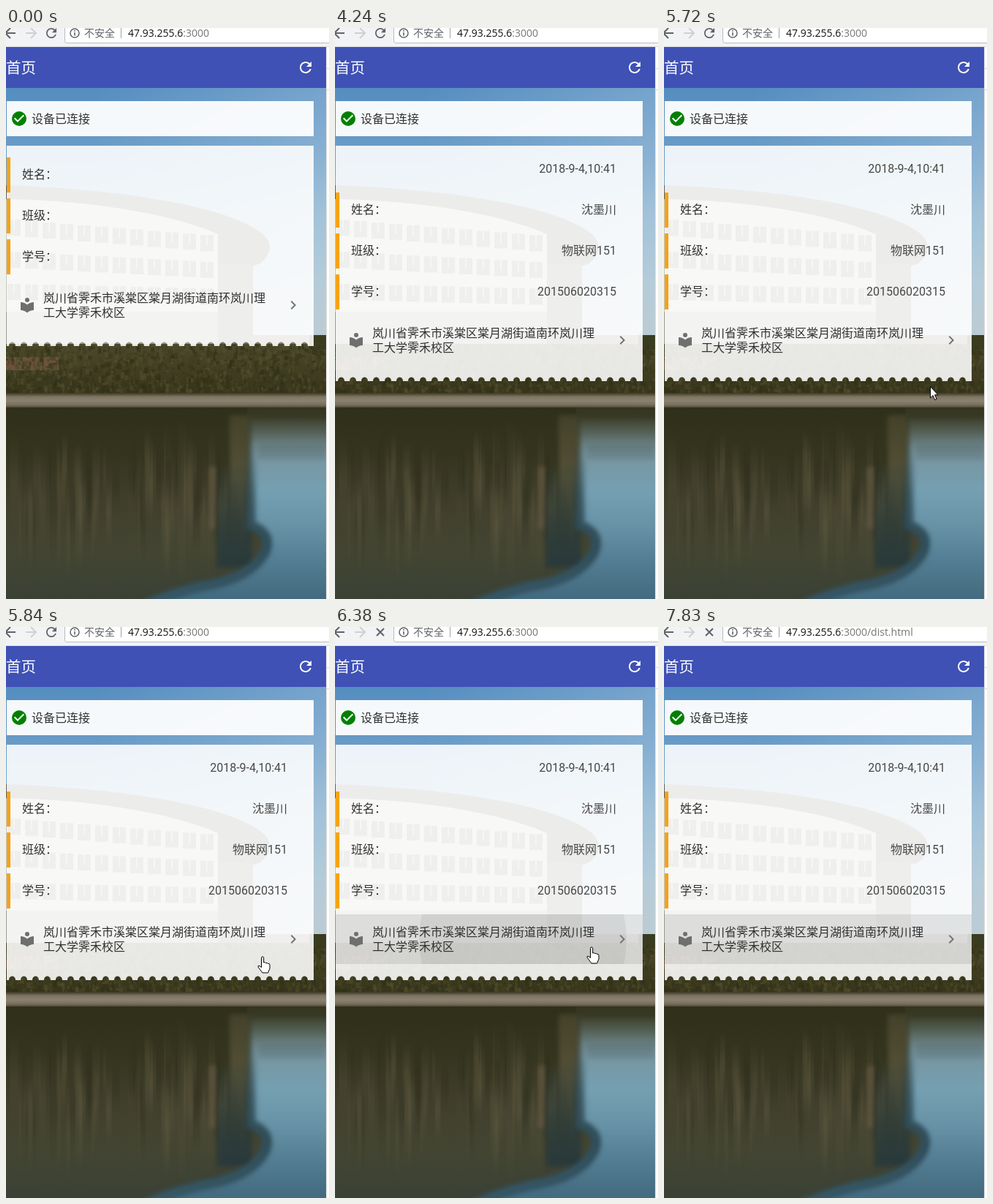
An HTML page with a canvas for the animation above (8000 ms loop, 442x781 px).

```html
<!DOCTYPE html>
<html lang="zh-CN">
<head>
<meta charset="utf-8">
<title>首页</title>
<style>
  html, body { margin: 0; width: 100%; height: 100%; overflow: hidden; background: #fff; }
  canvas, svg { position: absolute; left: 0; top: 0; }
  text { font: 16px Roboto, 'Noto Sans CJK SC', 'Noto Sans CJK', sans-serif; fill: #303030; white-space: pre; }
  .browser text { font: 14px 'Open Sans', 'Noto Sans CJK SC', 'Noto Sans CJK', sans-serif; fill: #5f6368; }
  .value { fill: #484848; text-anchor: end; }
  .line { fill: none; stroke: #5f6368; stroke-width: 2; }
  .cursor { fill: #fff; stroke: #000; stroke-linejoin: round; }
</style>
</head>
<body>
<canvas id="photo" width="442" height="781"></canvas>
<svg width="442" height="781" viewBox="0 0 442 781">
  <defs>
    <path id="refresh" d="M17.65 6.35C16.2 4.9 14.21 4 12 4c-4.42 0-7.99 3.58-7.99 8s3.57 8 7.99 8c3.73 0 6.84-2.55 7.73-6h-2.08c-.82 2.33-3.04 4-5.65 4-3.31 0-6-2.69-6-6s2.69-6 6-6c1.66 0 3.14.69 4.22 1.78L13 11h7V4z"/>
    <clipPath id="rowClip"><rect x="1" y="345" width="420" height="68"/></clipPath>
  </defs>

  <g class="browser">
    <rect width="442" height="26" fill="#f2f3f4"/>
    <rect y="25" width="442" height="1" fill="#dcdde0"/>
    <rect x="80.5" y="-10" width="400" height="30.5" rx="3" fill="#fff" stroke="#b9bbbe"/>
    <path class="line" d="M13 7H0M6 0L-1 7l7 7"/>
    <path class="line" style="stroke:#cfd0d2" d="M27 7h13M34 0l7 7-7 7"/>
    <use id="reload" href="#refresh" fill="#5f6368" transform="translate(51.5 -3.5) scale(.88)"/>
    <path id="stop" class="line" d="M57 2l10 10M67 2L57 12"/>
    <circle cx="94" cy="7" r="6" class="line" style="stroke-width:1.5"/>
    <path class="line" style="stroke-width:1.6" d="M94 6v4.5M94 3v1.8"/>
    <text x="107" y="12">不安全</text>
    <rect x="157" width="1" height="14" fill="#a0a3a7"/>
    <text x="167" y="12"><tspan fill="#111">47.93.255.6</tspan><tspan fill="#777">:3000</tspan><tspan id="path" fill="#777">/dist.html</tspan></text>
  </g>

  <rect x="438" y="26" width="4" height="755" fill="#fff"/>
  <path d="M438.5 26V781M438 55.5h4M438 84.5h4" stroke="#d8d8d8"/>

  <rect y="26" width="438" height="56" fill="#3f51b5"/>
  <text x="0" y="61.5" style="font-size:20.5px;fill:#fff">首页</text>
  <use href="#refresh" fill="#fff" transform="translate(398 42)"/>

  <rect x="1" y="100" width="420" height="48" fill="#fff" fill-opacity=".94"/>
  <circle cx="18" cy="124" r="10" fill="#008000"/>
  <path d="M11.7 123.3l4.3 4.3 8.3-8.3" fill="none" stroke="#fff" stroke-width="2"/>
  <text x="35" y="129.5">设备已连接</text>

  <path id="card" fill="#fff" fill-opacity=".88"/>
  <text id="date" class="value" x="385" y="198">2018-9-4,10:41</text>
  <g id="rows">
    <g fill="#f5a314">
      <rect x="1" y="177" width="5" height="48"/>
      <rect x="1" y="233" width="5" height="48"/>
      <rect x="1" y="289" width="5" height="48"/>
    </g>
    <text x="22" y="206">姓名：</text>
    <text x="22" y="262">班级：</text>
    <text x="22" y="318">学号：</text>
    <g id="values">
      <text id="name" class="value" x="385" y="206"></text>
      <text class="value" x="385" y="262">物联网151</text>
      <text id="number" class="value" x="385" y="318"></text>
    </g>
    <g clip-path="url(#rowClip)">
      <rect id="hover" x="1" y="345" width="420" height="68" fill-opacity=".09"/>
      <circle id="ripple" cx="257" cy="379" fill-opacity=".06"/>
    </g>
    <path fill="#6f6f6f" transform="translate(17 367)" d="M12 11.55C9.64 9.35 6.48 8 3 8v11c3.48 0 6.64 1.35 9 3.55 2.36-2.19 5.52-3.55 9-3.55V8c-3.48 0-6.64 1.35-9 3.55zM12 8a3 3 0 1 0 0-6 3 3 0 0 0 0 6z"/>
    <text x="51" y="374.5">岚川省霁禾市溪棠区棠月湖街道南环岚川理</text>
    <text x="51" y="394.5">工大学霁禾校区</text>
    <path fill="#757575" transform="translate(381 367)" d="M10 6L8.59 7.41 13.17 12l-4.58 4.59L10 18l6-6z"/>
  </g>

  <path id="arrow" class="cursor" d="M.5 .5V16l3.6-3.4 2.6 6 2.4-1-2.6-5.8H11z"/>
  <path id="hand" class="cursor" d="M5.5 13V2.5a1.6 1.6 0 0 1 3.2 0V9q1.5-1 3 .6 1.5-.7 2.7.7 2.6-.4 2.6 2V17l-2.5 6H7L1 15q-.5-2.5 2-1.5l2.5 2z"/>
</svg>

<script>
const $ = id => document.getElementById(id);
const ctx = $('photo').getContext('2d');

let seed = 7;
const random = (min, max) => {
  seed = (seed * 16807) % 2147483647;
  return min + (max - min) * seed / 2147483647;
};
const gradient = (x0, y0, x1, y1, ...colors) => {
  const g = ctx.createLinearGradient(x0, y0, x1, y1);
  colors.forEach((c, i) => g.addColorStop(i / (colors.length - 1), c));
  return g;
};
const rect = (fill, x, y, w, h) => { ctx.fillStyle = fill; ctx.fillRect(x, y, w, h); };
const shape = (fill, d) => { ctx.fillStyle = fill; ctx.fill(new Path2D(d)); };

function drawSky() {
  rect(gradient(0, 82, 0, 430, '#548dc0', '#6b9dc7', '#8cb4d0', '#a2bfd0', '#adc0c8'), 0, 82, 438, 350);
  rect(gradient(120, 0, 438, 0, 'rgba(255,255,255,0)', 'rgba(255,255,255,.2)'), 0, 82, 438, 350);
}

function drawBuilding() {
  shape('#c6c6c0', 'M0 234C120 236 230 255 290 282V432H0z');
  shape('#62625c', 'M0 215C140 220 300 240 352 282Q372 302 348 322Q325 332 290 330V282C230 255 120 236 0 234z');
  rect('#72726c', 290, 322, 48, 110);
  for (let row = 0; row < 3; row++) {
    for (let x = 2; x < 275; x += 24) {
      const y = 262 + row * 44 + x * .08 * (1 - row * .35);
      rect('#7c7c77', x, y, 18, 22);
      rect('#b8b8b2', x + 8, y, 2, 14);
    }
  }
  rect('rgba(115,115,105,.5)', 0, 388, 338, 44);
  rect('#8a7a6c', 338, 420, 85, 14);
}

function drawTrees() {
  rect(gradient(0, 432, 0, 505, '#4c4a2b', '#403e22', '#34321a'), 0, 432, 438, 73);
  rect('#3a3c20', 415, 420, 23, 20);
  rect('#6b523c', 0, 450, 72, 18);
  const tones = ['#2f3017', '#423f22', '#555031', '#4a4526', '#37351b'];
  ctx.globalAlpha = .55;
  for (let i = 0; i < 1400; i++) {
    rect(tones[i % tones.length], random(-2, 436), random(432, 496), random(2, 6), random(2, 9));
  }
  ctx.globalAlpha = 1;
  rect(gradient(0, 499, 0, 521, '#3b371f', '#7f7563', '#8b8170', '#776e5c', '#3a3823'), 0, 499, 438, 22);
}

function drawLake() {
  rect(gradient(0, 519, 0, 781, '#30301a', '#35351f', '#403f2c', '#434532', '#3a4135'), 0, 519, 438, 262);
  for (let i = 0; i < 90; i++) {
    const x = random(0, 320), y = random(535, 630), h = random(70, 160);
    const tone = i % 3 ? '105,96,68' : '34,35,18';
    rect(gradient(0, y, 0, y + h, `rgba(${tone},0)`, `rgba(${tone},.18)`, `rgba(${tone},0)`), x, y, random(4, 12), h);
  }

  ctx.filter = 'blur(3px)';
  rect(gradient(0, 530, 0, 700, 'rgba(104,98,70,.35)', 'rgba(104,98,70,.6)', 'rgba(104,98,70,0)'), 306, 530, 30, 170);
  rect('rgba(112,98,74,.6)', 278, 600, 9, 85);
  rect(gradient(0, 600, 0, 740, 'rgba(35,58,60,.1)', '#29393b'), 289, 600, 48, 138);

  // Open water, with the darker rim around the reflected building.
  const shore = 'M335 535V680Q364 690 355 716Q338 748 288 760Q240 768 190 790';
  shape(gradient(0, 535, 0, 781, '#50594a', '#7895a0', '#75a0b2', '#6792a6', '#527c91', '#436b80'), shore + 'H450V535z');
  ctx.strokeStyle = gradient(0, 560, 0, 781, 'rgba(45,72,82,0)', 'rgba(45,72,82,.6)', '#2f4e5b', '#365665');
  ctx.lineWidth = 14;
  ctx.stroke(new Path2D(shore));
  rect('rgba(70,88,88,.25)', 345, 568, 93, 22);
  ctx.filter = 'none';
  rect(gradient(0, 519, 0, 570, '#35351f', 'rgba(70,78,64,0)'), 330, 519, 108, 51);
}

ctx.save();
ctx.beginPath();
ctx.rect(0, 82, 438, 699);
ctx.clip();
drawSky();
drawBuilding();
drawTrees();
drawLake();
ctx.restore();

// Card outline with a perforated lower edge.
const cardPath = bottom =>
  `M1 161H421V${bottom}h-1` + 'h-7a4.5 5.5 0 0 0 -9 0'.repeat(26) + 'H1z';

const show = (id, on) => $(id).setAttribute('visibility', on ? 'visible' : 'hidden');
const place = (id, x, y) => $(id).setAttribute('transform', `translate(${x} ${y})`);

// start time, cursor, x, y
const pointer = [
  [0], [5450, 'arrow', 425, 565], [5570, 'arrow', 394, 536], [5720, 'arrow', 364, 490],
  [5840, 'hand', 344, 450], [5990, 'hand', 344, 437], [6530]
];

function render(t) {
  const filled = t >= 500, second = t >= 4240, loading = t >= 6380, moved = t >= 6530;
  $('card').setAttribute('d', cardPath(filled ? 483 : 435));
  place('rows', 0, filled ? 48 : 0);
  show('date', filled);
  show('values', filled);
  $('name').textContent = second ? '沈墨川' : '苏禾';
  $('number').textContent = second ? '201506020315' : '201506020433';

  show('hover', t >= 5990);
  show('ripple', t >= 6110 && !moved);
  $('ripple').setAttribute('r', loading ? 142 : 75);
  show('reload', !loading);
  show('stop', loading);
  show('path', moved);

  const [, cursor, x, y] = pointer.filter(p => p[0] <= t).pop();
  for (const id of ['arrow', 'hand']) show(id, id === cursor);
  if (cursor) place(cursor, x, y);
}

const start = performance.now();
function tick() {
  render((performance.now() - start) % 8000);
  requestAnimationFrame(tick);
}
tick();
</script>
</body>
</html>
```
